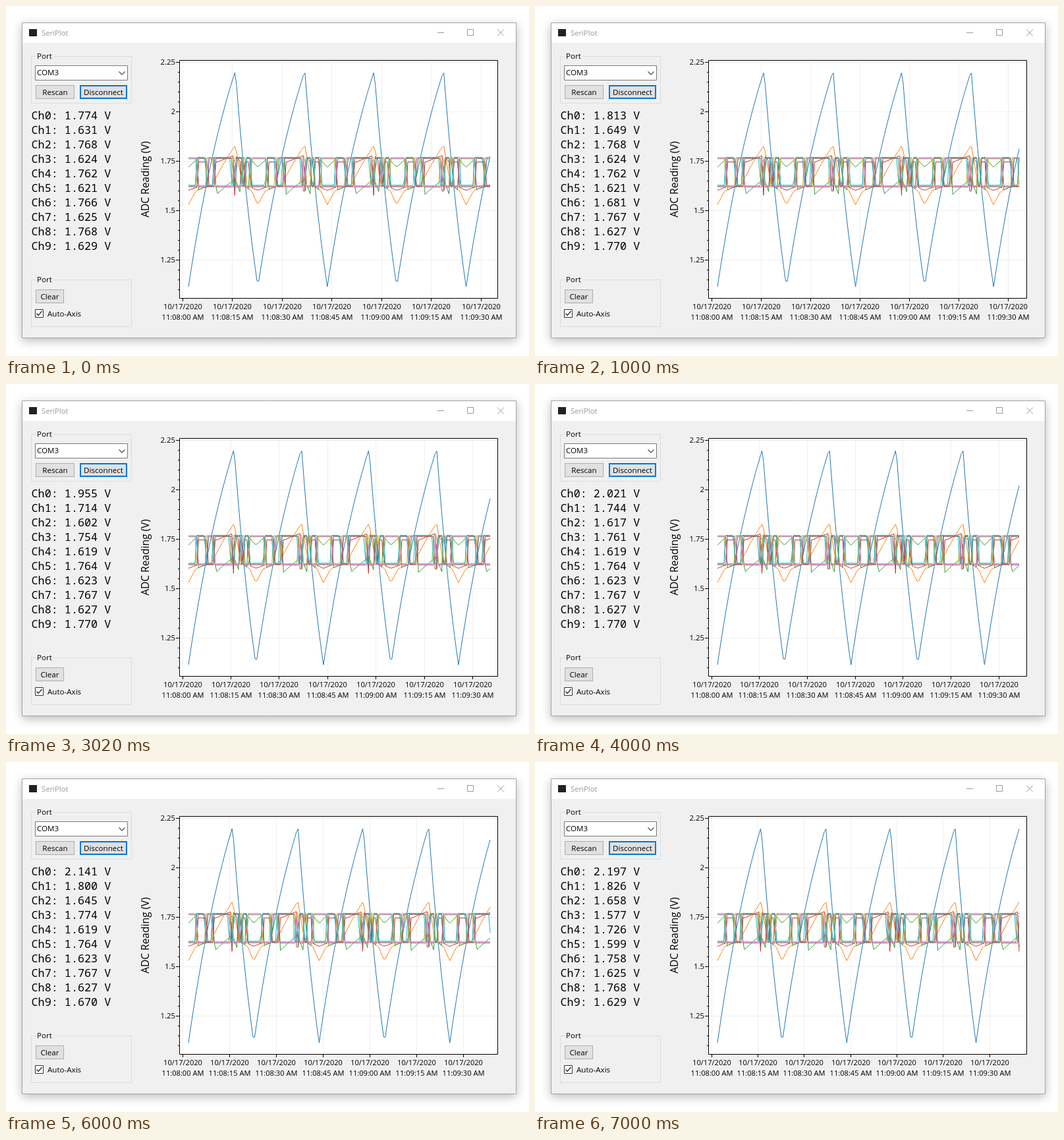
An HTML page with a canvas for the animation above (8 s loop, 794 by 531 pixels).

```html
<!DOCTYPE html>
<html lang="en">
<head>
<meta charset="utf-8">
<title>Serial plotter</title>
<style>
html, body { margin: 0; width: 100%; height: 100%; overflow: hidden; background: #fff; }
canvas { display: block; width: 794px; height: 531px; }
</style>
</head>
<body>
<canvas id="stage" width="794" height="531"></canvas>
<script>
const ctx = document.getElementById('stage').getContext('2d');
const SANS = '"Open Sans", "Noto Sans", sans-serif';
const MONO = '"Noto Sans Mono", "DejaVu Sans Mono", monospace';
const COLORS = ['#1f77b4', '#ff7f0e', '#2ca02c', '#d62728', '#9467bd',
  '#8c564b', '#e377c2', '#7f7f7f', '#bcbd22', '#17becf'];

const LOOP = 8000;
const UPDATES = [0, 1000, 2000, 3020, 4000, 5000, 6000, 7000];

// ---- signal model, time counted in samples ----
const SAMPLE_SEC = 0.5165, PERIOD = 40.5, RISE = 27.4, LOW = 1.115;
const clamp01 = x => Math.max(0, Math.min(1, x));
const charge = u => LOW + 2.07 * (1 - Math.exp(-u / 36.5));
const PEAK = charge(RISE);

// Capacitor charging, then discharging
function drive(n) {
  const u = n % PERIOD;
  if (u < RISE) return charge(u);
  return PEAK * Math.pow(LOW / PEAK, (u - RISE) / (PERIOD - RISE));
}

// First floating input: a weakened copy of the drive
function follow(v) {
  if (v > 1.774) return 1.631 + 0.46 * (v - 1.774);
  if (v > 1.35) return 1.6 + 0.073 * (v - 1.35);
  return 1.53 + 0.3 * (v - LOW);
}

// Low and high level of a floating input; the nearest ones lean on the drive
function levels(ch, v) {
  if (ch === 2) {
    const low = v > 1.7 ? 1.586 + 0.229 * (v - 1.884) : 1.6 + 0.08 * (v - 1.357);
    return [low, Math.min(1.768, 1.72 + 0.15 * (v - LOW))];
  }
  if (ch === 3) {
    return [Math.min(1.624, 1.603 + 0.06 * (v - LOW)), 1.746 + 0.108 * Math.max(0, v - 1.884)];
  }
  return [1.622 + (ch - 5.5) * 0.002, 1.764 + (ch - 5) * 0.0015];
}

// Floating inputs flip as the drive crosses four thresholds
function signal(ch, n) {
  const v = drive(n);
  if (ch === 0) return v;
  if (ch === 1) return follow(v);
  const past = edge => clamp01((v - edge - (9 - ch) * 0.009) / 0.006 + 0.5);
  const top = past(2.1402);
  const odd = past(1.357) - past(1.612) + past(1.785) - top;
  const sag = top * Math.max(0, 0.05 - 0.014 * (ch - 3));
  const [low, high] = levels(ch, v);
  return low + (high - low) * (ch % 2 ? odd : 1 - odd) - sag;
}

// ---- drawing helpers ----
function rect(x, y, w, h, fill, stroke) {
  if (fill) { ctx.fillStyle = fill; ctx.fillRect(x, y, w, h); }
  if (stroke) {
    ctx.strokeStyle = stroke;
    ctx.lineWidth = 1;
    ctx.strokeRect(x + 0.5, y + 0.5, w - 1, h - 1);
  }
}

function path(points, color, width = 1) {
  ctx.beginPath();
  points.forEach(([x, y]) => ctx.lineTo(x, y));
  ctx.strokeStyle = color;
  ctx.lineWidth = width;
  ctx.stroke();
}

function text(str, x, y, size = 11.6, color = '#000', align = 'left', family = SANS) {
  ctx.font = `${size}px ${family}`;
  ctx.fillStyle = color;
  ctx.textAlign = align;
  ctx.fillText(str, x, y);
}

function group(title, x, y, w, h) {
  rect(x, y, w, h, null, '#dcdcdc');
  rect(x + 7, y, 27, 1, '#f0f0f0');
  text(title, x + 9, y + 4);
}

function button(label, x, y, w, h, focus) {
  rect(x, y, w, h, focus ? '#0078d7' : '#adadad');
  const b = focus ? 2 : 1;
  rect(x + b, y + b, w - 2 * b, h - 2 * b, '#e1e1e1');
  text(label, x + w / 2, y + h / 2 + 4, 11.6, '#000', 'center');
}

// ---- window ----
function drawWindow() {
  rect(0, 0, 794, 531, '#fff');
  ctx.save();
  ctx.shadowColor = 'rgba(0,0,0,0.27)';
  ctx.shadowBlur = 14;
  ctx.shadowOffsetY = 4;
  rect(24, 25, 751, 479, '#f0f0f0');
  ctx.restore();
  rect(24, 25, 751, 31, '#fff');
  rect(24, 25, 751, 479, null, '#a4a4a4');

  rect(35, 35, 12, 11, '#222');
  text('SeriPlot', 54, 45, 11.3, '#999');
  path([[655, 40.5], [665, 40.5]], '#999');
  rect(700, 35, 10, 10, null, '#999');
  path([[746, 35.5], [756, 45.5]], '#999');
  path([[756, 35.5], [746, 45.5]], '#999');

  group('Port', 38, 76, 153, 72);
  rect(44, 90, 141, 23, '#fff', '#7a7a7a');
  text('COM3', 47, 105);
  path([[171.5, 99.5], [176, 104], [180.5, 99.5]], '#444', 1.1);
  button('Rescan', 45, 120, 59, 21);
  button('Disconnect', 112, 120, 72, 21, true);

  group('Port', 38, 415, 153, 72);
  button('Clear', 45, 430, 43, 21);
  rect(44, 460, 13, 13, '#fff', '#333');
  path([[46.5, 466.5], [49.2, 469.3], [54.5, 463]], '#222', 1.3);
  text('Auto-Axis', 63, 471);
}

// ---- chart ----
const BOX = { x: 263, y: 82, w: 484, h: 362 };
const LEFT = 277, RIGHT = 735;
const toY = v => 235.5 - (v - 1.75) * 300;

function drawChart(count) {
  const step = (RIGHT - LEFT) / count;
  const pxPerSec = step / SAMPLE_SEC;

  rect(BOX.x, BOX.y, BOX.w, BOX.h, '#fff');

  for (let n = 22; n <= 45; n++) {
    const v = n * 0.05, y = Math.floor(toY(v) + 0.01), major = n % 5 === 0;
    const tick = major ? 5 : 2;
    if (major) {
      rect(BOX.x, y, BOX.w, 1, '#efefef');
      text(String(+v.toFixed(2)), 257, y + 4, 11.4, '#000', 'right');
    }
    rect(BOX.x - tick, y, tick, 1, '#000');
  }
  for (let s = 0; s <= 90; s += 15) {
    const x = Math.floor(268 + s * pxPerSec);
    const clock = `11:0${8 + Math.floor(s / 60)}:${String(s % 60).padStart(2, '0')} AM`;
    rect(x, BOX.y, 1, BOX.h, '#efefef');
    rect(x, BOX.y + BOX.h - 1, 1, 5, '#000');
    text('10/17/2020', x + 0.5, 460, 11.1, '#000', 'center');
    text(clock, x + 0.5, 476, 11.1, '#000', 'center');
  }

  ctx.lineJoin = 'round';
  COLORS.forEach((color, ch) => {
    const points = [];
    for (let n = 0; n <= count; n++) points.push([LEFT + n * step, toY(signal(ch, n))]);
    path(points, color);
  });
  rect(BOX.x, BOX.y, BOX.w, BOX.h, null, '#000');

  ctx.save();
  ctx.translate(217, 263);
  ctx.rotate(-Math.PI / 2);
  text('ADC Reading (V)', 0, 0, 15.5, '#000', 'center');
  ctx.restore();
}

function drawReadings(count) {
  COLORS.forEach((_, ch) => {
    const volts = signal(ch, count).toFixed(3);
    text(`Ch${ch}: ${volts} V`, 38.5, 172 + ch * 22, 16.8, '#000', 'left', MONO);
  });
}

function frame() {
  const now = performance.now() % LOOP;
  const k = UPDATES.filter(t => t <= now).length - 1;
  const count = Math.max(176, 175 + 2 * k);
  drawWindow();
  drawChart(count);
  drawReadings(count);
  requestAnimationFrame(frame);
}
frame();
</script>
</body>
</html>
```
